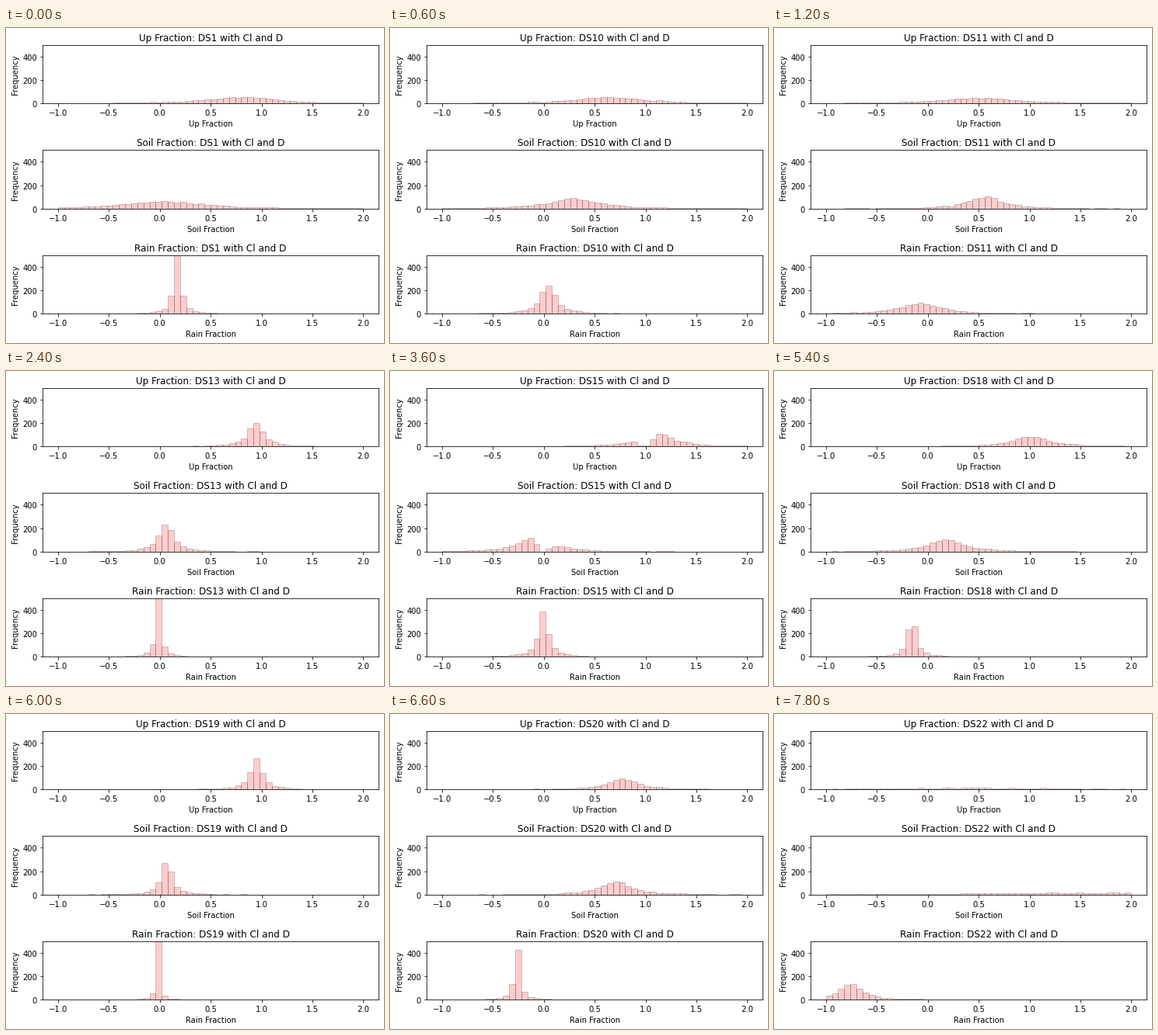
Recreate the animation shown at these times as a matplotlib script. Size 486 by 406 pixels, loop 8000 ms.

```python
import numpy as np
import matplotlib.pyplot as plt
from matplotlib.animation import FuncAnimation
from matplotlib.transforms import Affine2D

W, H, DPI = 486, 406, 72
EDGES = np.linspace(-1, 2, 51)
MIDS = (EDGES[:-1] + EDGES[1:]) / 2
PARTS = ("Up", "Soil", "Rain")
STEP_MS, STEPS, HOLD = 200, 40, 3   # each data set stays for HOLD steps
NAMES = ["DS1"] + [f"DS{n}" for n in range(10, 23)]

# One peak per panel: centre, height, half width and an optional empty notch.
KEYS = {
    "DS1": [(0.80, 56, 0.39), (0.04, 62, 0.45), (0.17, 640, 0.033)],
    "DS11": [(0.50, 46, 0.47), (0.566, 104, 0.20), (-0.08, 92, 0.23)],
    "DS13": [(0.944, 214, 0.083), (0.065, 245, 0.08), (-0.013, 580, 0.027)],
    "DS15": [(1.10, 120, 0.186, 0.99), (-0.076, 158, 0.156, 0.0),
             (-0.004, 393, 0.054)],
    "DS17": [(1.07, 27, 0.69), (0.29, 36, 0.66), (-0.298, 146, 0.14)],
    "DS19": [(0.95, 268, 0.066), (0.068, 300, 0.057), (-0.016, 900, 0.014)],
    "DS22": [(0.40, 12, 1.10), (2.00, 16, 1.70), (-0.754, 145, 0.126)],
}
KEY_POS = [NAMES.index(name) for name in KEYS]
rng = np.random.default_rng(4)


def peak_for(index, row):
    """Peak of one panel; data sets without a key lie between neighbours."""
    if NAMES[index] in KEYS:
        return KEYS[NAMES[index]][row]
    centre, top, width = zip(*(rows[row][:3] for rows in KEYS.values()))
    between = lambda values: np.interp(index, KEY_POS, values)
    return (between(centre), np.exp(between(np.log(top))),
            np.exp(between(np.log(width))))


def counts(centre, top, width, notch=None):
    """Bell with long tails, slightly rough, empty where it gets too low."""
    h = top / (1 + ((MIDS - centre) / width) ** 2)
    if notch is not None:
        h *= 1 - np.exp(-((MIDS - notch) / 0.09) ** 2)
    h += 0.4 * np.sqrt(h) * rng.normal(size=h.size)
    return np.where(h < 2.5, 0, h)


HEIGHTS = [[counts(*peak_for(i, row)) for row in range(len(PARTS))]
           for i in range(len(NAMES))]

plt.rcParams.update({"font.family": "DejaVu Sans", "font.size": 10})
fig = plt.figure(figsize=(W / DPI, H / DPI), dpi=DPI, facecolor="white")
ONE_DOWN = Affine2D().translate(0, -1)


def panel(row, part):
    bottom = 97.2 + 135.5 * row
    ax = fig.add_axes([47.12 / W, 1 - bottom / H, 432 / W, 75.3 / H])
    bars = ax.bar(EDGES[:-1], np.zeros(MIDS.size), np.diff(EDGES),
                  align="edge", facecolor="red", edgecolor="black",
                  linewidth=1, alpha=0.2)
    ax.set(xlim=(-1.15, 2.15), ylim=(0, 500), xlabel=f"{part} Fraction",
           ylabel="Frequency", xticks=np.arange(-1, 2.1, 0.5),
           yticks=(0, 200, 400))
    title = ax.set_title("", fontsize=12)
    # The x label follows its tick labels, so it needs no shift of its own.
    for text in [title, ax.yaxis.label, *ax.get_xticklabels(),
                 *ax.get_yticklabels()]:
        text.set_transform(text.get_transform() + ONE_DOWN)
    return title, bars


panels = [panel(row, part) for row, part in enumerate(PARTS)]


def update(step):
    index = step // HOLD
    for part, (title, bars), values in zip(PARTS, panels, HEIGHTS[index]):
        title.set_text(f"{part} Fraction: {NAMES[index]} with Cl and D")
        for bar, value in zip(bars, values):
            bar.set_height(value)
            bar.set_visible(value > 0)


anim = FuncAnimation(fig, update, frames=STEPS, interval=STEP_MS,
                     init_func=lambda: update(0), repeat=True, repeat_delay=0)
plt.show()
```
